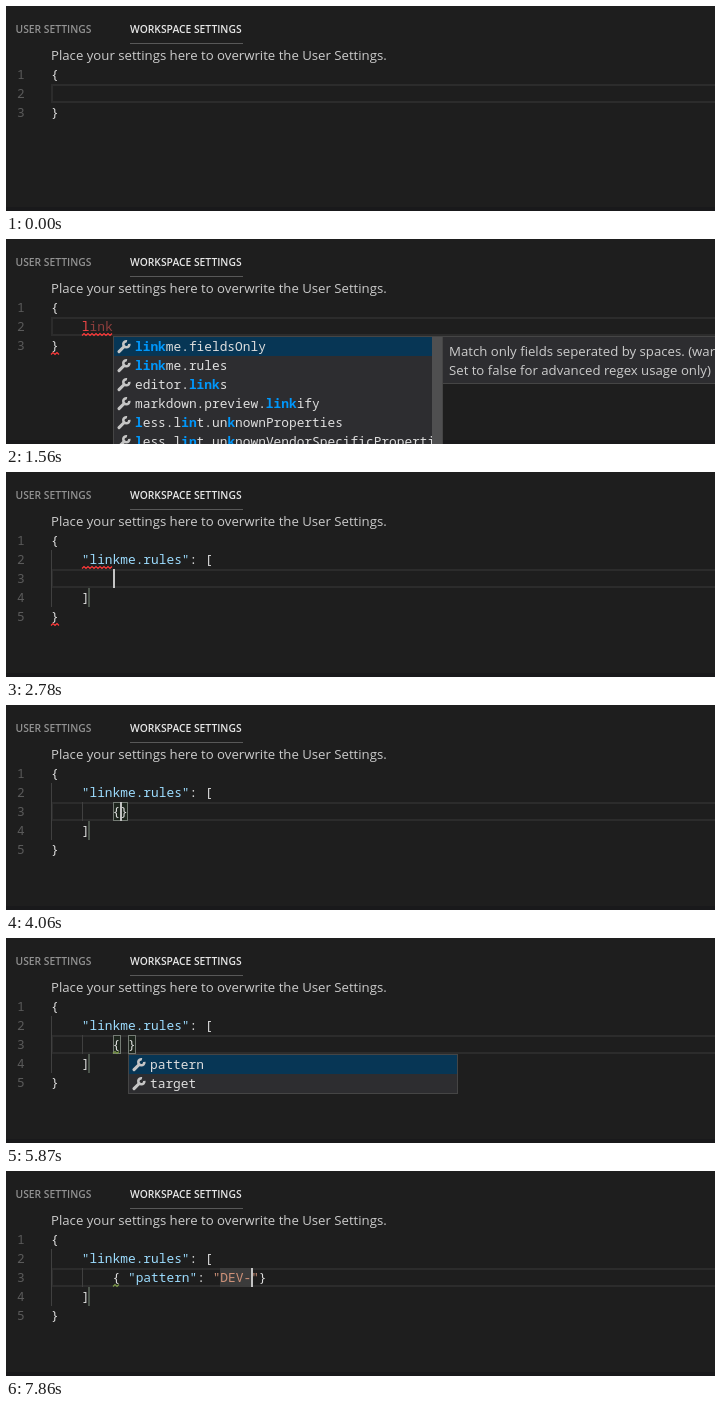
Animation of 709x205 px, one loop 8 s. Source, as an HTML page:

```html
<!DOCTYPE html>
<html lang="en">
<head>
<meta charset="utf-8">
<title>Workspace settings</title>
<style>
html, body { margin: 0; width: 100%; height: 100%; overflow: hidden; background: #1e1e1e; }
svg { display: block; width: 709px; height: 205px; }
text { white-space: pre; }
.code { font: 500 12.83px "Noto Sans Mono", "DejaVu Sans Mono", monospace; }
.ui { font: 500 13.2px "Open Sans", "Noto Sans", sans-serif; }
.tab { font-size: 10.3px; font-weight: 600; }
.hit { fill: #0097fb; font-weight: 700; }
</style>
</head>
<body>
<svg id="stage" viewBox="0 0 709 205" width="709" height="205"></svg>
<script>
const LOOP = 8000, CHAR = 7.698, ROW = 19;
const C = {
  plain: '#dedede', key: '#9cdcfe', str: '#ce9178', bad: '#f44747', dim: '#8f3f3d',
  num: '#5a5a5a', panel: '#2d2d30', edge: '#454545', warn: '#7d9a4a', err: '#ff3a3a'
};
const colX = c => 45 + c * CHAR;
const px = c => Math.round(colX(c));
const rowY = r => 59 + ROW * (r - 1);

const rect = (x, y, w, h, fill, more = '') =>
  `<rect x="${x}" y="${y}" width="${w}" height="${h}" fill="${fill}" ${more}/>`;
const frame = (x, y, w, h, fill, line) =>
  rect(x + .5, y + .5, w - 1, h - 1, fill, `stroke="${line}"`);
const text = (x, y, s, fill, cls) =>
  `<text x="${x}" y="${y}" fill="${fill}" class="${cls}">${s}</text>`;

function squiggle(x, y, w, color) {
  let d = `M${x} ${y + 2.5}`;
  for (let i = 2; i <= w; i += 2) d += `L${x + i} ${y + (i % 4 ? .5 : 2.5)}`;
  return `<path d="${d}" fill="none" stroke="${color}" stroke-width="1.2"/>`;
}

const wrench = (x, y) =>
  `<g transform="translate(${x} ${y}) scale(1.12)" fill="none" stroke="#c5c5c5">
  <path d="M1.8 10.4L6.4 5.8" stroke-width="2.8" stroke-linecap="round"/>
  <path d="M8.9 1.2A2.7 2.7 0 1 0 11 3.5" stroke-width="2.3"/></g>`;

// Underscores enclose the matched letters of a suggestion.
const label = s => s.split('_').map((p, i) =>
  i % 2 ? `<tspan class="hit">${p}</tspan>` : p).join('');

function popup({ col, row, items, info, slider }) {
  const x = px(col), y = rowY(row) + ROW, w = 330;
  let out = frame(x, y, w, items.length * ROW + 2, C.panel, C.edge);
  out += rect(x + 1, y + 1, w - 2, ROW, '#073655');
  out += `<clipPath id="list"><rect x="${x}" y="${y}" width="${w - 7}" height="200"/></clipPath><g clip-path="url(#list)">`;
  items.forEach((s, i) => {
    const top = y + 1 + i * ROW;
    out += wrench(x + 4, top + 3) + text(x + 22, top + 14, label(s), C.plain, 'code');
  });
  out += '</g>';
  if (slider) out += rect(x + w - 11, y + 1, 10, 120, '#4f4f50');
  if (info) {
    out += frame(x + w - 1, y, 420, info.length * ROW + 10, C.panel, C.edge);
    info.forEach((s, i) => out += text(x + w + 6, y + 20 + i * ROW, s, '#cccccc', 'ui'));
  }
  return out;
}

const fieldsInfo = ['Match only fields seperated by spaces. (warning:', 'Set to false for advanced regex usage only)'];
const launchInfo = ['Global debug launch configuration. Should be', "used as an alternative to 'launch.json' that is shared", 'across workspaces'];
const rulesInfo = ['Rules for turning matched text into links. Every', 'rule has a pattern to look for and a target to', 'open'];
const patternInfo = ['Regular expression that finds the text to be', 'shown as a link'];
const launchList = ['_l_aunch', ...['argumentsInColorFunction', 'boxModel', 'compatibleVendorPrefixes',
  'duplicateProperties', 'emptyRules'].map(s => '_l_ess.lint.' + s)];

function linkList(word) {
  const m = `_${word}_`, rest = 'link'.slice(word.length);
  const tail = word === 'link' ? 'un_k_nown' : 'unknown';
  const lint = `_l_ess.l_${word.slice(1, 3)}_${word.length < 3 ? 'n' : ''}t.${tail}`;
  return [`${m}${rest}me.fieldsOnly`, `${m}${rest}me.rules`, `editor.${m}${rest}s`,
    `markdown.preview.${m}${rest}ify`, lint + 'Properties', lint + 'VendorSpecificProperties'];
}
const ownList = word => ['fieldsOnly', 'rules'].map(s =>
  `_${word}_${'linkme.'.slice(word.length)}${s}`);

const open = [0, '{', C.plain], close = [0, '}', C.plain];
const typed = s => ({
  lines: [[open], [[4, s[0], C.bad], [5, s.slice(1), C.dim]], [close]],
  cursor: [4 + s.length, 2]
});
const suggest = (col, row, items, info, slider) => ({ pop: { col, row, items, info, slider } });
const suggestLink = word => suggest(4 + word.length, 2, linkList(word), fieldsInfo, true);
const suggestOwn = word => suggest(4 + word.length, 2, ownList(word), fieldsInfo);
const rules = (...third) => ({
  lines: [[open], [[4, '"linkme.rules"', C.key], [18, ':', C.plain], [20, '[', C.plain]],
    third, [[4, ']', C.plain]], [close]]
});
const entry = value => {
  const n = value.length;
  return {
    ...rules([8, '{', C.plain], [10, '"pattern"', C.key], [19, ':', C.plain],
      [21, `"${value}"`, C.str], [23 + n, '}', C.plain]),
    cursor: [22 + n, 3], mark: [22, n]
  };
};
const off = { cursor: null };

const steps = [
  [0, { lines: [[open], [], [close]], bar: 2 }],
  [460, { cursor: [4, 2] }],
  [690, typed('l')],
  [740, suggest(5, 2, launchList)],
  [770, suggest(5, 2, launchList, launchInfo)],
  [820, typed('li')],
  [860, suggestLink('li')],
  [920, typed('lin')],
  [960, suggestLink('lin')],
  [1040, typed('link')],
  [1100, suggestLink('link')],
  [1560, { ...off, linkErr: 1, endErr: 1 }],
  [1610, typed('linkm')],
  [1650, suggestOwn('linkm')],
  [1740, typed('linkme')],
  [1790, suggestOwn('linkme')],
  [2120, { ...typed('linkme.'), ...suggestOwn('linkme.') }],
  [2300, typed('linkme.r')],
  [2350, suggest(12, 2, ['_linkme.r_ules'], rulesInfo)],
  [2780, { ...rules(), pop: null, cursor: [8, 3], bar: 3, guide: 1 }],
  [2860, { endErr: 0 }],
  [3270, off],
  [3500, { linkErr: 0 }],
  [3730, { cursor: [8, 3] }],
  [4060, { ...rules([8, '{}', C.plain]), cursor: [9, 3], boxes: [8, 9], guide: 2 }],
  [4240, { ...rules([8, '{ }', C.plain]), cursor: [10, 3], boxes: [8, 10] }],
  [4750, off],
  [4930, { warn: 1 }],
  [5210, { cursor: [10, 3] }],
  [5740, off],
  [5850, suggest(10, 3, ['pattern', 'target'])],
  [5950, suggest(10, 3, ['pattern', 'target'], patternInfo)],
  [6330, { ...entry(''), pop: null, boxes: [8, 23], warn: 0 }],
  [6380, { boxes: [] }],
  [6790, off],
  [7020, { warn: 1 }],
  [7300, entry('D')],
  [7480, entry('DE')],
  [7660, entry('DEV')],
  [7860, entry('DEV-')]
];

function draw(s) {
  let out = rect(0, 0, 709, 205, '#1e1e1e') + rect(0, 201, 709, 4, '#19191b');
  out += text(9.5, 27, 'USER SETTINGS', '#929292', 'ui tab');
  out += text(124, 27, 'WORKSPACE SETTINGS', '#e7e7e7', 'ui tab');
  out += rect(124, 37, 113, 1, '#585858');
  out += text(45, 54, 'Place your settings here to overwrite the User Settings.', '#cccccc', 'ui');
  out += rect(46, rowY(s.bar) + 1, 680, 17, 'none', 'stroke="#2c2c2c" stroke-width="2"');
  if (s.guide) {
    out += rect(45, 78, 1, 57, '#404040') + rect(82, 116, 2, 19, '#4d564d');
    if (s.guide > 1) out += rect(76, 97, 1, 19, '#404040');
  }
  if (s.mark) out += rect(px(s.mark[0]), 97, Math.max(2, Math.round(s.mark[1] * CHAR)), 19, '#3b3b3b');
  for (const c of s.boxes || []) out += frame(px(c), 97, 8, 19, '#1d251d', '#747b74');
  s.lines.forEach((line, i) => {
    const y = rowY(i + 1) + 14;
    out += text(11, y, i + 1, C.num, 'code');
    for (const [c, str, fill] of line) out += text(colX(c), y, str, fill, 'code');
  });
  if (s.linkErr) out += squiggle(76, 94, 31, C.err);
  if (s.endErr) out += squiggle(45, rowY(s.lines.length) + 16, 8, C.err);
  if (s.warn) out += squiggle(107, 113, 7, C.warn);
  if (s.cursor) out += rect(px(s.cursor[0]), rowY(s.cursor[1]), 2, ROW, '#c4c4c4');
  if (s.pop) out += popup(s.pop);
  return out;
}

const stage = document.getElementById('stage');
let shown = -1;
function render(t) {
  const n = steps.filter(([at]) => at <= t).length;
  if (n === shown) return;
  shown = n;
  stage.innerHTML = draw(Object.assign({}, ...steps.slice(0, n).map(e => e[1])));
}

const start = performance.now();
function tick() {
  render((performance.now() - start) % LOOP);
  requestAnimationFrame(tick);
}
tick();
</script>
</body>
</html>
```
